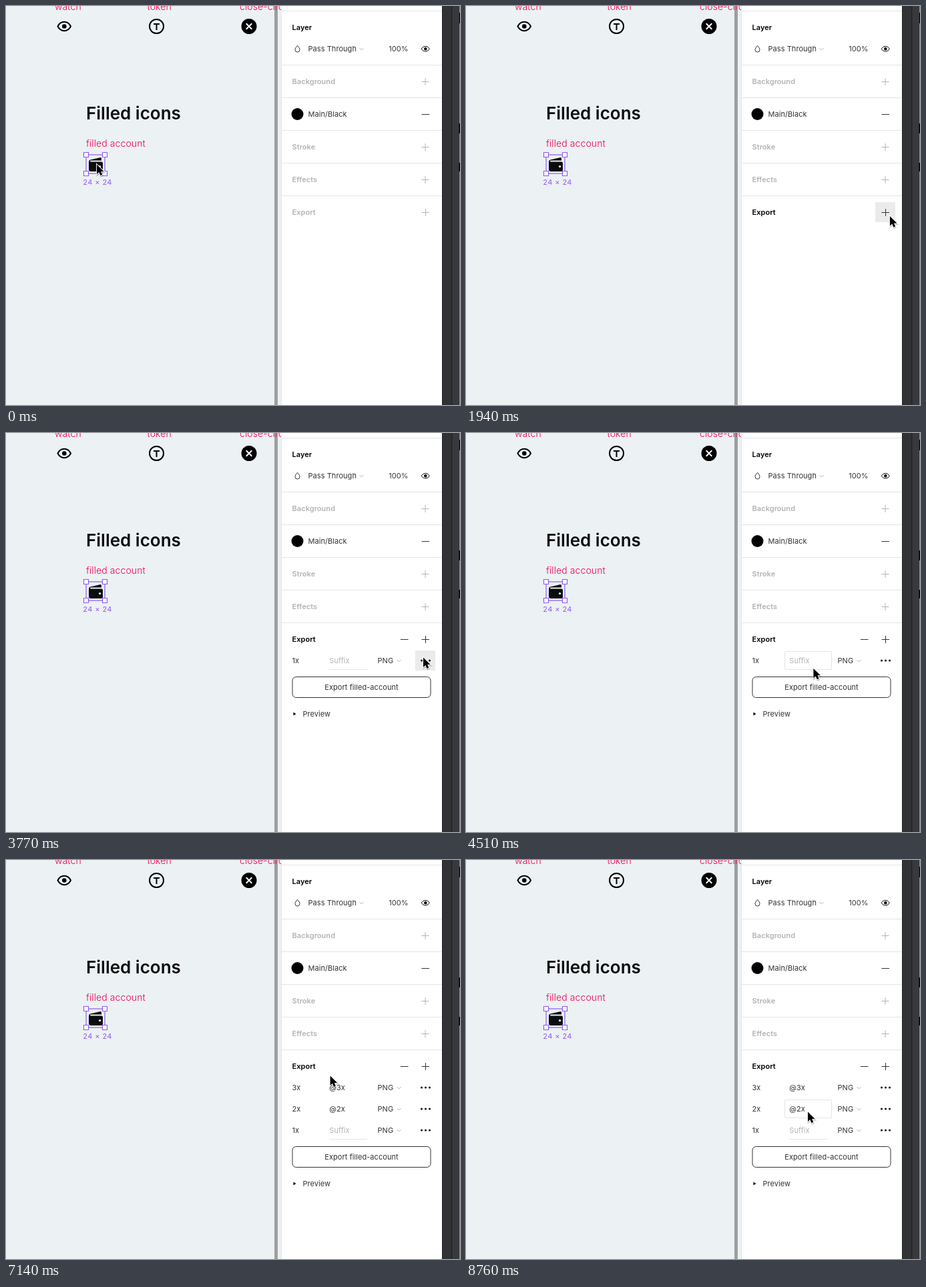
Write an HTML page that moves like this. It is 680 px wide and 598 px high and loops after 8.79 s.

```html
<!DOCTYPE html>
<html lang="en">
<head>
<meta charset="utf-8">
<title>Export settings</title>
<style>
  html, body { margin: 0; width: 100%; height: 100%; overflow: hidden; background: #ecf1f4; }
  svg { display: block; width: 680px; height: 598px; }
  text { font-family: Inter, "Liberation Sans", sans-serif; white-space: pre; }
  .ui { font-size: 11px; letter-spacing: .055px; fill: #333; }
  .head { font-weight: 600; }
  .off { fill: #b3b3b3; }
  .on { fill: #000; }
  .label { font-size: 14px; font-weight: 300; fill: #f2004b; letter-spacing: .1px; }
  .line { fill: none; stroke: #333; }
  .line.off { stroke: #b3b3b3; }
  .rule { fill: #e5e5e5; }
  .hover { fill: #ebebeb; }
  .field { fill: #fff; stroke: #e5e5e5; }
</style>
</head>
<body>
<svg viewBox="0 0 680 598">
  <rect width="680" height="598" fill="#ecf1f4"/>
  <rect x="402" width="5" height="598" fill="#9e9e9f"/>
  <g class="label">
    <text x="73" y="6">watch</text>
    <text x="211.500" y="6">token</text>
    <text x="350" y="6">close-circle</text>
    <text x="120" y="210.500">filled account</text>
  </g>
  <text x="120" y="170" font-size="26" font-weight="600" fill="#0b0c0d">Filled icons</text>

  <!-- canvas icons -->
  <g fill="none" stroke="#000" stroke-width="2">
    <path d="M77.500 30.500C82 21.600 92.500 21.600 97 30.500C92.500 39.400 82 39.400 77.500 30.500Z"/>
    <circle cx="87.300" cy="30.500" r="3.300" fill="#000" stroke="none"/>
    <circle cx="225.500" cy="30.500" r="10.500"/>
    <path d="M221 27h9M225.500 27v9"/>
    <circle cx="364" cy="30.500" r="11.500" fill="#000" stroke="none"/>
    <path d="M360.300 26.800l7.400 7.400m0-7.400l-7.400 7.400" stroke="#fff" stroke-linecap="round"/>
  </g>
  <path d="M124 233.500Q124 231.300 126.200 230.600L140.500 227.200Q143 226.700 143 229V231.500H127Q126 231.500 126 232.500T127 233.500H143Q145 233.500 145 235.500V245.500Q145 248 142.500 248H127Q124 248 124 245Z" fill="#0b0c0d"/>
  <circle cx="140.500" cy="240.500" r="1.600" fill="#fff"/>

  <!-- selection -->
  <g fill="#fff" stroke="#8d5cf5" stroke-width="1.200">
    <rect x="120" y="223" width="28" height="28" fill="none"/>
    <path d="M116.500 219.500h7v7h-7zM144.500 219.500h7v7h-7zM116.500 247.500h7v7h-7zM144.500 247.500h7v7h-7z"/>
  </g>
  <text x="115.300" y="268" font-size="11" letter-spacing=".4" fill="#8d5cf5">24 × 24</text>

  <!-- side panel -->
  <rect x="412" width="241" height="598" fill="#fff"/>
  <path class="rule" d="M412 0h1v598h-1zM413 7h240v1h-240zM413 88h240v1h-240zM413 137h240v1h-240zM413 186h240v1h-240zM413 235h240v1h-240zM413 284h240v1h-240z"/>
  <rect x="653" width="27" height="598" fill="#303236"/>
  <rect x="653" width="1" height="598" fill="#1f2022"/>
  <rect x="667" width="1.500" height="598" fill="#222326"/>
  <rect x="668.500" width="10" height="598" fill="#37393d"/>
  <rect x="679" width="1" height="598" fill="#8f9193"/>
  <path d="M678.500 176h1.500v15h-1.500zM678.500 235h1.500v13h-1.500zM679 10h1v16h-1z"/>

  <g class="ui">
    <text class="head on" x="428.500" y="36">Layer</text>
    <text x="452.500" y="68">Pass Through</text>
    <text x="573.300" y="68">100%</text>
    <text x="452.500" y="166">Main/Black</text>
    <text class="head off" x="428.500" y="117">Background</text>
    <text class="head off" x="428.500" y="215">Stroke</text>
    <text class="head off" x="428.500" y="264">Effects</text>
  </g>
  <path class="line" d="M436.500 59.300C434.700 61.500 433 63.600 433 65.500a3.500 3.500 0 0 0 7 0C440 63.600 438.300 61.500 436.500 59.300Z"/>
  <path class="line off" d="M529.500 63l3 3 3-3M622.500 113.500h11m-5.500-5.500v11M622.500 211.500h11m-5.500-5.500v11M622.500 260.500h11m-5.500-5.500v11"/>
  <path class="line" d="M622.500 162.500h11.500"/>
  <path d="M622.300 64.200C625 59.200 631.500 59.200 634.200 64.200C631.500 69.200 625 69.200 622.300 64.200Z" fill="none" stroke="#000"/>
  <circle cx="628.300" cy="64.200" r="2.200"/>
  <circle cx="436.500" cy="162" r="9"/>

  <g id="export"></g>
  <g id="cursor">
    <path d="M.5 2v14.500l3.300-3 2.100 4.900 2.800-1.100-2-4.900h4.400z" fill="#000" opacity=".22" stroke="#000" stroke-width="2"/>
    <path d="M0 .5v14.500l3.300-3 2.100 4.900 2.800-1.100-2-4.900h4.400z" stroke="#fff" stroke-width="1.800" paint-order="stroke"/>
  </g>
</svg>
<script>
const LOOP = 8790;
const panel = document.getElementById('export');
const cursor = document.getElementById('cursor');

// pointer stops: time, x, y
const stops = [
  [0, 136, 237], [560, 136, 237], [980, 372, 338], [1120, 430, 348], [1340, 466, 309],
  [1430, 462, 311], [1600, 450, 316], [2010, 650, 314], [2330, 627, 307], [3170, 627, 307],
  [3450, 512, 334], [3770, 625, 336], [4040, 621, 337], [4400, 524, 366],
  [4560, 520, 345], [4930, 628, 308], [4960, 629, 309], [5750, 629, 309], [5900, 628.5, 308.5],
  [6960, 628.5, 308.5], [7140, 486, 323], [7300, 448, 350], [7480, 456, 402],
  [7640, 492, 448], [7830, 508, 418], [7890, 509, 412], [8230, 504, 338], [8560, 511, 367],
  [8730, 511, 367], [8760, 512, 377], [LOOP, 512, 377]
];

// smooth tangent that never overshoots a stop
function slope(i, k) {
  if (!i || i === stops.length - 1) return 0;
  const [a, b, c] = [stops[i - 1], stops[i], stops[i + 1]];
  const before = (b[k] - a[k]) / (b[0] - a[0]);
  const after = (c[k] - b[k]) / (c[0] - b[0]);
  return before * after <= 0 ? 0 : 2 * before * after / (before + after);
}

function pointer(t) {
  const i = stops.findIndex(s => s[0] > t) - 1;
  const [a, b] = [stops[i], stops[i + 1]];
  const span = b[0] - a[0], u = (t - a[0]) / span, v = 1 - u;
  return [1, 2].map(k =>
    v * v * (1 + 2 * u) * a[k] + u * u * (3 - 2 * u) * b[k] +
    span * u * v * (v * slope(i, k) - u * slope(i + 1, k)));
}

const text = (x, y, s, cls = '') => `<text class="ui ${cls}" x="${x}" y="${y}">${s}</text>`;
const line = (d, cls = '') => `<path class="line ${cls}" d="${d}"/>`;

function section(t, x, y) {
  const count = [2640, 5280, 6230].filter(s => t >= s).length;
  const ring = [[2480, 2640], [5120, 5280], [6100, 6230]].some(([a, b]) => t >= a && t < b);
  const over = (l, top, w, h) => x >= l && x < l + w && y >= top && y < top + h;
  const button = (l, top) => over(l, top, 30, 30)
    ? `<rect class="hover" x="${l}" y="${top}" width="30" height="30"/>` : '';
  const field = (l, top, w) => over(l, top, w, 28)
    ? `<rect class="field" x="${l + .5}" y="${top + .5}" width="${w - 1}" height="27" rx="1.500"/>` : '';

  const active = count || over(413, 285, 240, 49);
  let out = text(428.5, 313, 'Export', active ? 'head on' : 'head off') + button(613, 294);
  if (ring) out += '<rect x="613.500" y="294" width="30" height="30" rx="1" fill="#ebebeb" stroke="#1b8ef2" stroke-width="2"/>';
  out += line('M622.500 309.500h11.500m-5.500-5.500v11', active ? '' : 'off');
  if (!count) return out;

  out += button(581, 294) + line('M591 309.500h11.500');
  for (let i = 0; i < count; i++) {
    const n = count - i, top = 327 + 32 * i, base = top + 18;
    const suffixOver = field(477, top, 71);
    out += field(421, top, 49) + suffixOver + field(549, top, 55) + button(613, top - 1);
    out += text(428.5, base, n + 'x') + text(556.5, base, 'PNG');
    out += n > 1 ? text(484.300, base, `@${n}x`) : text(484.300, base, 'Suffix', 'off');
    if (n === 1 && !suffixOver) out += `<rect class="rule" x="484" y="${top + 27}" width="57" height="1"/>`;
    out += line(`M585.500 ${top + 13}l3 3 3-3`, 'off');
    for (const cx of [622.5, 628.5, 634.5]) out += `<circle cx="${cx}" cy="${top + 14}" r="1.500"/>`;
  }
  const top = 333.5 + 32 * count;
  return out +
    `<rect class="line" x="429" y="${top}" width="207" height="31" rx="5.500"/>` +
    `<text class="ui" x="532.500" y="${top + 19.5}" text-anchor="middle">Export filled-account</text>` +
    `<path d="M430.500 ${top + 53}l4 2.500-4 2.500z"/>` + text(444.5, top + 59.5, 'Preview');
}

let shown;
function frame(now) {
  const t = now % LOOP;
  const [x, y] = pointer(t);
  const html = section(t, x, y);
  if (html !== shown) panel.innerHTML = shown = html;
  cursor.setAttribute('transform', `translate(${x.toFixed(1)} ${y.toFixed(1)})`);
  requestAnimationFrame(frame);
}
requestAnimationFrame(frame);
</script>
</body>
</html>
```
